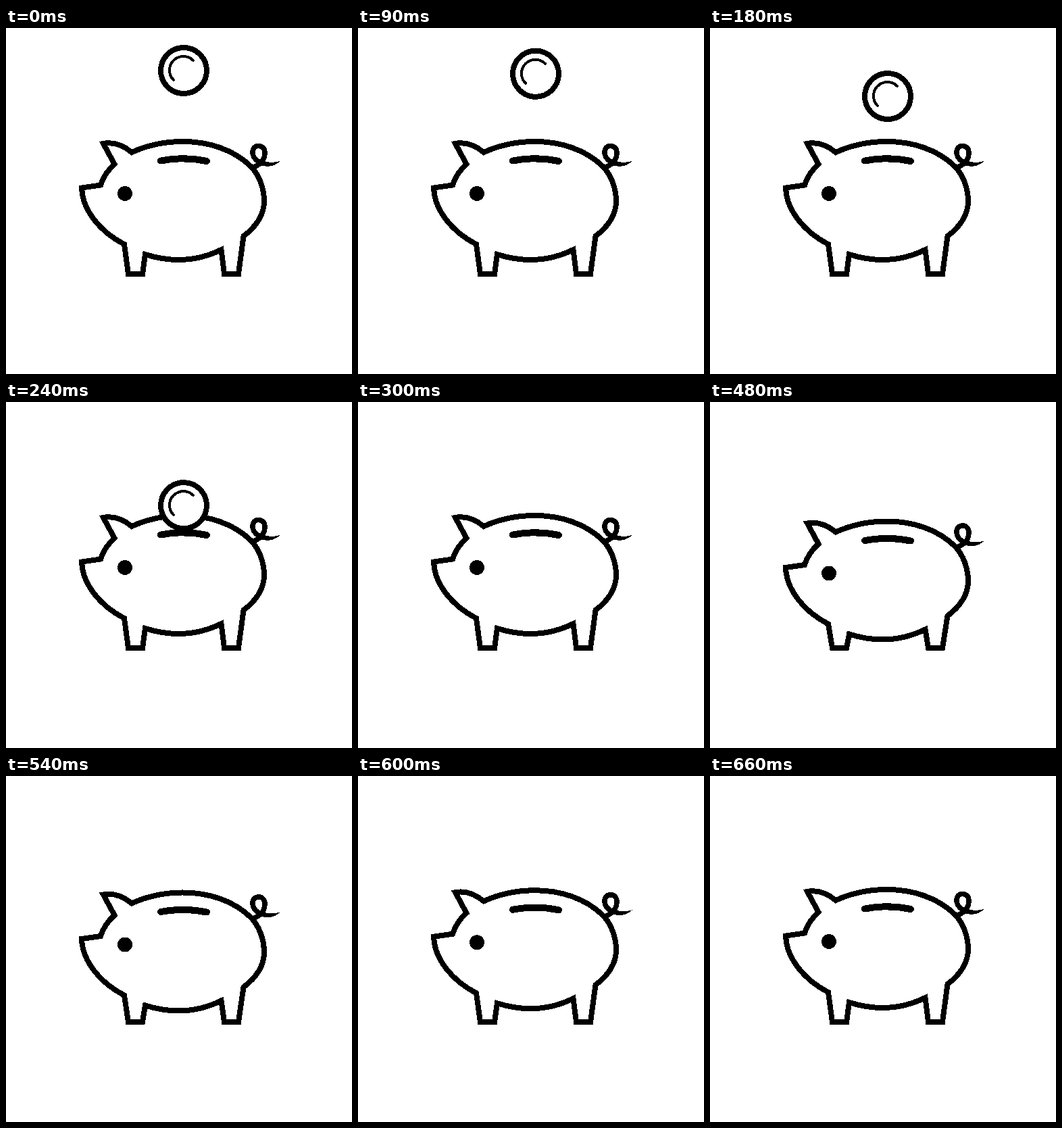
An HTML page for the animation above (1.05 s loop, 512 by 512 pixels).

```html
<!DOCTYPE html>
<html>
<head>
<meta charset="utf-8">
<style>
  html, body { margin: 0; width: 100%; height: 100%; overflow: hidden; background: #fff; }
  svg { display: block; width: 100%; height: 100%; shape-rendering: crispEdges; }
</style>
</head>
<body>
<svg viewBox="0 0 512 512" fill="none" stroke="#000" stroke-width="8">
  <clipPath id="above"><path d="M0 0H512V197H297Q263 189 229 197H0Z"/></clipPath>
  <path id="body"/>
  <g id="details">
    <circle cx="176" cy="245" r="11" fill="#000" stroke="none"/>
    <path stroke-width="7.5" d="M363 207.5C376 203 383 195 383 185C383 178 379 174.5 374 174.5C368 174.5 365 178 365 184C365 192 372 199 382 200.5"/>
    <path fill="#000" stroke="none" d="M380 196.5C389 200 398 199 406 197C399 203 391 207 379 203.5Z"/>
  </g>
  <g clip-path="url(#above)">
    <g id="coin">
      <circle cx="263" cy="63" r="34" fill="#fff"/>
      <path stroke-width="4" stroke-linecap="round" d="M277 48A20.5 20.5 0 0 0 248 77"/>
    </g>
  </g>
  <path id="slot" stroke-width="10" stroke-linecap="round" d="M229 196.5Q263 190 297 197"/>
</svg>
<script>
const LOOP = 1050, STEP = 30, LAND = 300, LOW = 360, REST = 660, DIP = 13, FALL = 176;
const [body, details, coin, slot] =
  ['body', 'details', 'coin', 'slot'].map(id => document.getElementById(id));
const ease = p => (1 - Math.cos(Math.PI * p)) / 2;
const shift = (el, y) => el.setAttribute('transform', `translate(0 ${y})`);

function dipAt(t) {
  if (t <= LAND || t >= REST) return 0;
  return DIP * (t < LOW ? ease((t - LAND) / (LOW - LAND)) : 1 - ease((t - LOW) / (REST - LOW)));
}

// The feet stay on the ground while the rest sinks by d.
function outline(d) {
  const foot = 364 - d;
  return `M112 236.5L140 232.5C144 220 151 210 160.5 201.5L144 171C160 168 174 174 186 184
    C210 173 236 168 262 168C300 168 337 180 362.5 205C375 218 382 238 382 256
    C382 276 370 294 351.5 308L344 ${foot}H323L318.5 328C282 346 244 347 206 335
    L202 ${foot}H181L175 320C140 302 113 270 112 236.5Z`;
}

function draw(now) {
  const t = Math.floor(now % LOOP / STEP) * STEP;
  const d = dipAt(t);
  body.setAttribute('d', outline(d));
  for (const el of [body, details, slot]) shift(el, d);
  shift(coin, FALL * (t / LAND) ** 3);
  coin.style.display = t < LAND ? '' : 'none';
}

let start;
function frame(now) {
  start ??= now;
  draw(now - start);
  requestAnimationFrame(frame);
}
draw(0);
requestAnimationFrame(frame);
</script>
</body>
</html>
```
